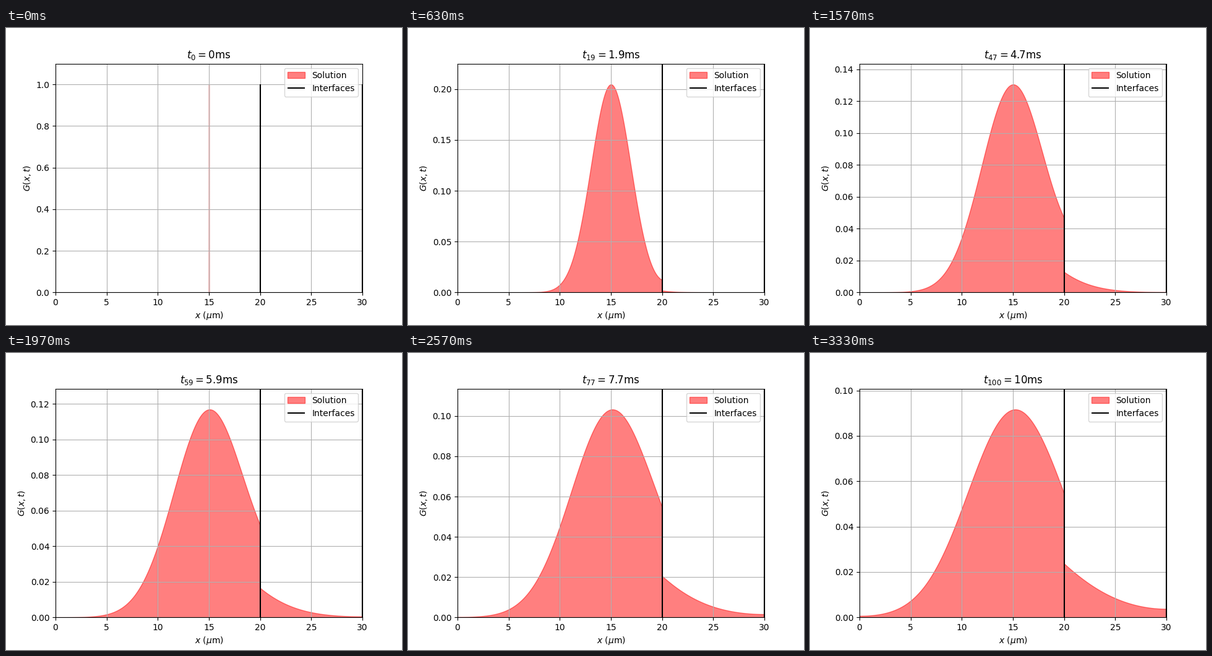
A matplotlib script for the animation above (3360 ms loop, 640x480 px).

```python
import math

import matplotlib.pyplot as plt
import numpy as np
from matplotlib.animation import FuncAnimation

LOOP, TICK = 3360, 20          # ms
START, WALL, END = 15, 20, 30  # source, membrane and outer boundary in um
D_LEFT, D_RIGHT = 1.0, 3.0     # um^2/ms
KAPPA = 0.4                    # membrane permeability, um/ms
RATE = KAPPA * (1 / math.sqrt(D_LEFT) + 1 / math.sqrt(D_RIGHT))

erfc = np.vectorize(math.erfc, otypes=[float])
left = np.linspace(0, WALL, 1001)
right = np.linspace(WALL, END, 501)
x = np.concatenate([left, right])


def gauss(d, t):
    return np.exp(-d**2 / (4 * D_LEFT * t)) / math.sqrt(4 * math.pi * D_LEFT * t)


def leak(s, t):
    """Response to the membrane at scaled travel distance s."""
    tail = erfc(s / (2 * math.sqrt(t)) + RATE * math.sqrt(t))
    return KAPPA * np.exp(RATE * s + RATE**2 * t) * tail


def solution(t):
    if t == 0:
        return np.where(np.isclose(x, START), 1.0, 0.0)
    to_wall = (WALL - START) / math.sqrt(D_LEFT)
    # free spread, mirror images at both walls, minus what leaks through
    g_left = (gauss(left - START, t) + gauss(left + START, t)
              + gauss(2 * WALL - START - left, t)
              - leak(to_wall + (WALL - left) / math.sqrt(D_LEFT), t)
              / math.sqrt(D_LEFT))
    # transmitted wave and its reflection at the outer boundary
    g_right = sum(leak(to_wall + d / math.sqrt(D_RIGHT), t)
                  for d in (right - WALL, 2 * END - WALL - right))
    return np.concatenate([g_left, g_right / math.sqrt(D_RIGHT)])


def outline(g):
    top = np.column_stack([x, g])
    return np.vstack([[0, 0], top, [END, 0]])


fig, ax = plt.subplots(figsize=(6.4, 4.8), dpi=100)
fill = ax.fill_between(x, solution(0), color="r", alpha=0.5, label="Solution")
ax.vlines([WALL, END], 0, 1, color="k", label="Interfaces")
ax.set_xlim(0, END)
ax.set_xlabel(r"$x$ ($\mu$m)")
ax.set_ylabel("$G(x,t)$")
ax.grid()
ax.legend(loc="upper right")
title = ax.set_title("")


def update(i):
    # 30 steps per second, sampled at the middle of each tick
    step = int((i + 0.5) * TICK * 0.03 + 0.15)
    t = step / 10
    g = solution(t)
    fill.set_verts([outline(g)])
    ax.set_ylim(0, 1.1 * g.max())
    title.set_text(f"$t_{{{step}}} = {t:g}$ms")
    return fill, title


anim = FuncAnimation(fig, update, frames=LOOP // TICK, interval=TICK,
                     repeat=True, repeat_delay=0)
plt.show()
```
